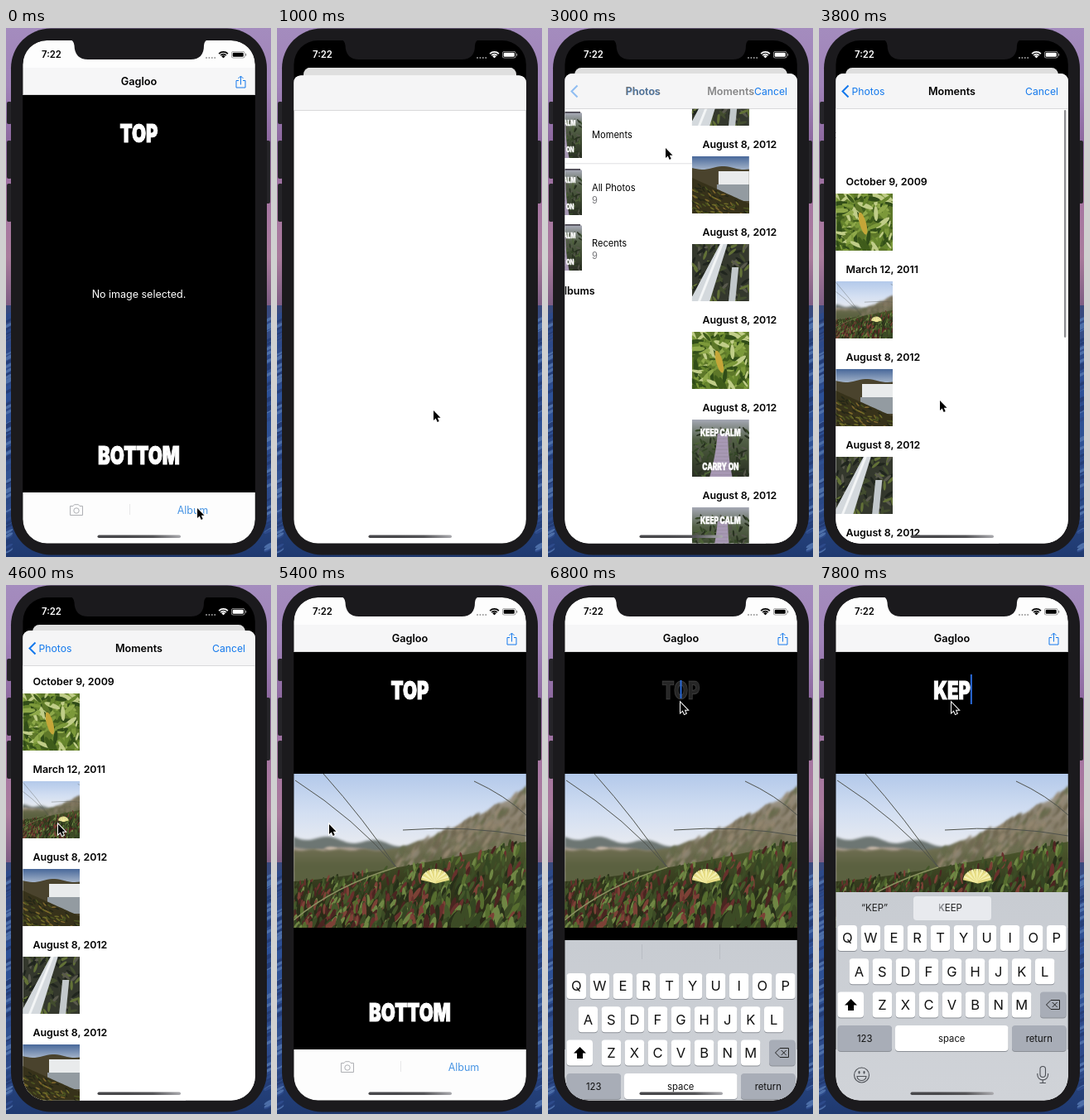
Write an HTML page with a canvas that moves like this. It is 320 px wide and 639 px high and loops after 8000 ms.

```html
<!DOCTYPE html>
<html lang="en">
<head>
<meta charset="utf-8">
<title>Caption app demo</title>
<style>
html, body { margin: 0; width: 100%; height: 100%; overflow: hidden; background: #1b1a1d; }
canvas { display: block; width: 320px; height: 639px; }
</style>
</head>
<body>
<canvas id="stage"></canvas>
<script>
const W = 320, H = 639, LOOP = 8000, STEP = 200;
const LEFT = 20, TOP = 15, WIDTH = 281, HEIGHT = 608, MID = 160.5;
const BLUE = '#1479ec', BEZEL = '#1b1a1d';
const canvas = document.getElementById('stage');
const ratio = window.devicePixelRatio || 1;
canvas.width = W * ratio;
canvas.height = H * ratio;
const c = canvas.getContext('2d');

// Helpers
const mix = (a, b, p) => a + (b - a) * p;
const progress = (t, from, to) => Math.max(0, Math.min(1, (t - from) / (to - from)));
const easeOut = (t, from, to, power = 3) => 1 - (1 - progress(t, from, to)) ** power;
function random(seed) {
  return () => (seed = (seed * 16807) % 2147483647) / 2147483647;
}
function scoped(draw) { c.save(); draw(); c.restore(); }
function shifted(x, y, draw) { scoped(() => { c.translate(x, y); draw(); }); }
function faded(alpha, draw) { scoped(() => { c.globalAlpha = alpha; draw(); }); }
function rect(x, y, w, h, fill) { c.fillStyle = fill; c.fillRect(x, y, w, h); }
function round(x, y, w, h, r, fill) {
  c.beginPath();
  c.roundRect(x, y, w, h, r);
  c.fillStyle = fill;
  c.fill();
}
function clip(x, y, w, h, r = 0) {
  c.beginPath();
  c.roundRect(x, y, w, h, r);
  c.clip();
}
function stroke(d, color, width = 1) {
  c.strokeStyle = color;
  c.lineWidth = width;
  c.stroke(new Path2D(d));
}
function fill(d, color) { c.fillStyle = color; c.fill(new Path2D(d)); }
function fade(vertical, from, to, ...colors) {
  const g = vertical ? c.createLinearGradient(0, from, 0, to) : c.createLinearGradient(from, 0, to, 0);
  colors.forEach((color, i) => g.addColorStop(i / (colors.length - 1), color));
  return g;
}
function text(s, x, y, { size = 12.5, weight = 400, color = '#000', align = 'left' } = {}) {
  c.font = `${weight} ${size}px Inter, Roboto, sans-serif`;
  c.textAlign = align;
  c.fillStyle = color;
  c.fillText(s, x, y);
}
// Condensed heavy caption face; returns the drawn width.
function caption(s, x, y, size = 30) {
  const narrow = 0.735;
  let width;
  shifted(x, y, () => {
    c.scale(narrow, 1);
    text(s, 0, 0, { size, weight: 900, color: '#fff', align: 'center' });
    c.strokeStyle = '#fff';
    c.lineWidth = size / 28;
    c.strokeText(s, 0, 0);
    width = c.measureText(s).width * narrow;
  });
  return width;
}

// Landscape pieces
function ridge(w, h, height, color) {
  c.beginPath();
  for (let x = 0; x <= w + 3; x += 3) c.lineTo(x, height(x));
  c.lineTo(w, h);
  c.lineTo(0, h);
  c.fillStyle = color;
  c.fill();
}
function fall(from, to, center, width, color) {
  for (let y = from; y < to; y++) rect(center(y) - width(y) / 2, y, width(y), 1.3, color);
}
function scatter(seed, count, colors, paint) {
  const rnd = random(seed);
  for (let i = 0; i < count; i++) paint(rnd, colors[Math.floor(rnd() * colors.length)], i / count);
}
function leaf(x, y, length, angle, color) {
  c.beginPath();
  c.ellipse(x, y, length, length * 0.28, angle, 0, 7);
  c.fillStyle = color;
  c.fill();
}

// Pictures
function beach() {
  const w = 281, h = 187;
  const dune = x => 92 - 76 * progress(x, 115, 285) ** 1.3 + Math.sin(x / 5);
  const bank = x => 130 - 48 * (x / w) ** 1.3;
  rect(0, 0, w, h, fade(true, 0, 95, '#b3c9ea', '#d3dff2', '#ecedf0'));
  scoped(() => {
    c.filter = `blur(${1.6 * ratio}px)`;
    ridge(w, h, x => 76 + Math.sin(x / 9) * 3 + x * 0.07, '#6d7673');
    ridge(w, h, x => 89 + Math.sin(x / 14) * 2 + x * 0.03, '#b0a295');
    scatter(5, 60, ['#80766e', '#c8b9aa', '#94897b'], (rnd, color) => leaf(rnd() * 125, 90 + rnd() * 38, 7, 0.1, color));
    ridge(w, h, dune, fade(true, 15, 110, '#a09c92', '#8b806b', '#5b6140'));
    scatter(77, 260, ['#968871', '#666b4b', '#8d8574', '#6f6751'], (rnd, color) => {
      const x = 125 + rnd() * 160;
      leaf(x, dune(x) + rnd() * 50, 6, -1, color);
    });
  });
  ridge(w, h, bank, fade(true, 90, h, '#4b562c', '#31371b', '#262313'));
  const greens = ['#44572a', '#566d2f', '#344522', '#6f8644', '#272f19', '#3c4b25'];
  const reds = ['#67302c', '#4b2521', '#7c4136'];
  scatter(41, 720, greens, (rnd, green, depth) => {
    const x = rnd() * w, y = mix(bank(x), 192, depth), size = mix(4, 11, depth) + x / 80;
    const red = rnd() < 0.45 - x / 900;
    leaf(x, y, size * (0.6 + rnd() * 0.5), rnd() * 0.9 - 1.75, red ? reds[Math.floor(rnd() * 3)] : green);
  });
  const tip = '124 113';
  stroke(`M2 8Q75 55 ${tip}M36 0Q85 55 ${tip}M132 68Q210 62 281 75M218 9Q255 26 281 50`, '#4f524c');
  stroke(`M0 177Q50 135 ${tip}`, '#8a9160', 1.4);
  for (let i = 0; i <= 14; i++) {
    const a = Math.PI * (1.05 + i / 15.5);
    stroke(`M172 131L${171 + Math.cos(a) * 17} ${129 + Math.sin(a) * 14}`, i % 2 ? '#f6f1b2' : '#e6dc83', 3);
  }
}
function leaves() {
  rect(0, 0, 69, 69, '#5d7729');
  scatter(31, 150, ['#3f5c1b', '#67862d', '#8fa94a', '#314d18', '#7c993a', '#c0cd88'],
    (rnd, color) => leaf(rnd() * 69, rnd() * 69, 4 + rnd() * 7, rnd() * 6, color));
  leaf(33, 36, 14, 1.3, '#c5a638');
}
function coast() {
  const shore = x => 26 + x * 0.45;
  rect(0, 0, 69, 69, fade(true, 0, 40, '#48689a', '#b9c5d4', '#8d9a9f'));
  ridge(69, 69, x => 14 + Math.sin(x / 8) * 2, '#4a432d');
  rect(32, 18, 37, 16, '#e9ebec');
  rect(30, 34, 39, 20, '#939ba1');
  ridge(69, 69, shore, '#37321a');
  scatter(9, 110, ['#6e6b27', '#242616', '#7f672c', '#4c5420'], (rnd, color) => {
    const x = rnd() * 69;
    leaf(x, shore(x) + 3 + rnd() * 40, 3, rnd(), color);
  });
}
function stream() {
  rect(0, 0, 69, 69, '#34382d');
  scatter(15, 90, ['#20251e', '#434d2f', '#59594d', '#627137'], (rnd, color) => leaf(rnd() * 69, rnd() * 69, 6, rnd() * 3, color));
  fall(0, 69, y => 38 - y * 0.42, y => 9 + y * 0.22, '#d4d9dd');
  fall(0, 69, y => 36 - y * 0.4, () => 3, '#f3f5f6');
  fall(28, 69, y => 55 - y * 0.1, () => 8, '#c2c8cb');
}
function poster() {
  rect(0, 0, 53, 55, fade(true, 0, 55, '#a5a8b4', '#536047', '#3b462f', '#292d24'));
  scatter(53, 130, ['#344627', '#4e6238', '#27301f', '#55564b'], (rnd, color) => leaf(rnd() * 53, 9 + rnd() * 46, 3, rnd() * 3, color));
  fall(13, 55, y => 29 - y / 25, y => 9 + (y / 17) ** 2.2, '#a798b4');
  caption('KEEP CALM', 26.5, 15, 8.7);
  caption('CARRY ON', 26.5, 47, 8.7);
}
function picture(draw, x, y, w, h, scale = 1, shift = 0) {
  scoped(() => {
    clip(x, y, w, h);
    c.translate(x - shift, y);
    c.scale(scale, scale);
    draw();
  });
}

// Phone
function wallpaper() {
  rect(0, 0, W, 346, fade(true, 0, 346, '#a48cbe', '#a083b8', '#8d689f', '#a676a2', '#a97b9c', '#76587f'));
  rect(0, 335, W, 304, fade(true, 335, H, '#39497c', '#2c5097', '#305292', '#1f3970'));
  scatter(21, 160, ['#243d77', '#4d6fa9', '#2d4a8a'], (rnd, color) => leaf(rnd() < 0.5 ? 3 : 317, 345 + rnd() * 290, 6, -0.5, color));
}
function phoneBody() {
  const button = (x, y, h) => round(x, y, 6, h, 2, '#252428');
  button(1, 89, 27);
  button(1, 136, 46);
  button(1, 188, 46);
  button(313, 136, 76);
  round(6, 0.5, 309, 636, 48, BEZEL);
}
function statusBar(color) {
  text('7:22', 55, 36, { size: 11.3, weight: 600, color, align: 'center' });
  for (let i = 0; i < 4; i++) round(241 + i * 3.4, 35, 2, 2, 1, '#999');
  for (let i = 0; i < 3; i++) {
    c.beginPath();
    c.arc(262.5, 36.4, 1.7 + i * 2.95, -Math.PI * 0.75, -Math.PI * 0.25);
    c.strokeStyle = color;
    c.lineWidth = i ? 1.8 : 3;
    c.stroke();
  }
  round(272, 28, 16.5, 8.5, 2.5, '#999');
  round(272.8, 28.8, 14.9, 6.9, 2, color === '#fff' ? '#000' : '#fff');
  round(273.7, 29.7, 13, 5.1, 1.2, color);
  round(289, 30.8, 1.2, 3, 0.6, '#888');
}
function notch() {
  fill('M76 13Q82 15 82.5 21Q83 38 99 38H223Q239 38 239 21Q239 15 246 13Z', BEZEL);
}

// Editor
function editor(t) {
  rect(LEFT, TOP, WIDTH, HEIGHT, '#000');
  rect(LEFT, TOP, WIDTH, 33, '#fdfdfd');
  rect(LEFT, 48, WIDTH, 33, '#f6f6f7');
  rect(LEFT, 80.5, WIDTH, 0.5, '#b8b8ba');
  text('Gagloo', MID, 69, { size: 12.7, weight: 600, align: 'center' });
  stroke('M281 63.5h-3v8.5h11v-8.5h-3M283.5 68.5v-10M280.5 61l3-3 3 3', BLUE);
  if (t >= 4600) picture(beach, LEFT, 228, WIDTH, 186);
  else text('No image selected.', MID, 326, { color: '#fff', align: 'center' });

  const focus = easeOut(t, 6600, 7100);
  const typed = 'KEP'.slice(0, Math.max(0, Math.floor((t - 7200) / STEP)));
  let width = 0;
  if (typed) width = caption(typed, MID, 138) + 2;
  else faded((1 - focus) ** 1.25, () => caption('TOP', MID, 138));
  if (focus > 0) {
    const h = 36 * focus ** 2;
    rect(MID + width / 2 - 1, 126 - h / 2, 2, h, '#2a6ad8');
  }
  caption('BOTTOM', MID, 527);

  rect(LEFT, 561, WIDTH, 62, '#fdfdfd');
  rect(149.3, 575, 0.7, 13, '#dedee0');
  stroke('M77.5 577.5h3.5l1.5-1.8h5l1.5 1.8h3.5v11h-15zM88.2 583a3.2 3.2 0 1 0-6.4 0a3.2 3.2 0 1 0 6.4 0', '#aeb0b4');
  text('Album', 225.5, 586.7, { color: '#4a96e4', align: 'center' });
  if (focus > 0) shifted(0, Math.round(268 * (1 - focus)), () => keyboard(typed));
}

// Keyboard
const SMALL = 11.3, DARK_KEY = '#a8adb7';
function key(x, y, w, label, size = 16.5, color = '#fff') {
  round(x, y + 1, w, 31, 4, '#8b8f96');
  round(x, y, w, 31, 4, color);
  text(label, x + w / 2, y + 15.5 + size * 0.36, { size, color: '#111', align: 'center' });
}
function suggestions(typed) {
  const style = { size: 11.5, color: '#222' };
  if (typed) text(`“${typed}”`, 67, 394, { ...style, align: 'center' });
  if (typed === 'KEP') {
    round(114, 376, 94, 29, 4, '#e8eaee');
    text('KEEP', 144, 394, style);
    text('K', 144, 394, { ...style, color: '#999ba0' });
  } else {
    rect(113, 376, 0.7, 18, '#b2b6bd');
    rect(207, 376, 0.7, 18, '#b2b6bd');
  }
}
function keyboard(typed) {
  const pitch = 28.05, ink = '#4d5056';
  rect(LEFT, 371, WIDTH, 268, fade(true, 371, 623, '#c8ccd2', '#d0d3d8'));
  suggestions(typed);
  ['QWERTYUIOP', 'ASDFGHJKL', 'ZXCVBNM'].forEach((letters, row) => {
    const x = MID + 2.3 - letters.length * pitch / 2;
    [...letters].forEach((letter, i) => key(x + i * pitch, 411 + row * 40.2, 23.5, letter));
  });
  key(22.5, 491.5, 31.5, '');
  fill('M38.5 500l7.5 7.5h-4v6.5h-7v-6.5h-4z', '#000');
  key(267, 491.5, 31.5, '', SMALL, DARK_KEY);
  stroke('M274.5 507l5.5-5.5h10.5v11h-10.5zM281.7 504l6 6m0-6l-6 6', '#222');
  key(22.5, 532, 65.5, '123', SMALL, DARK_KEY);
  key(92, 532, 136.5, 'space', SMALL);
  key(233, 532, 65.5, 'return', SMALL, DARK_KEY);

  stroke('M60.5 592a9 9 0 1 0-18 0a9 9 0 1 0 18 0M46 593.5h11a5.5 5 0 0 1-11 0z', ink, 1.1);
  round(47.5, 587, 2, 3.5, 1, ink);
  round(53.5, 587, 2, 3.5, 1, ink);
  c.beginPath();
  c.roundRect(267, 581.5, 6.5, 13, 3.2);
  c.stroke();
  stroke('M263.8 590v1.5a6.4 6.4 0 0 0 12.8 0v-1.5M270.2 598v3.5m-3.7 0h7.4', ink, 1.1);
}

// Photo picker
function albumList() {
  rect(LEFT, 97, WIDTH, 526, '#fff');
  ['Moments', 'All Photos', 'Recents'].forEach((name, i) => {
    const y = i ? 104 + i * 67 : 102;
    rect(29, y - 1, 48, 2, '#4c4953');
    rect(27.5, y + 0.5, 51, 2, '#777581');
    picture(poster, 26, y + 1, 53, 54);
    text(name, 91, y + (i ? 25.7 : 31), { size: 11.1 });
    if (i) text('9', 91, y + 41, { size: 11.1, color: '#77777b' });
    stroke(`M283 ${y + 24.5}l4 4-4 4`, '#b9b9bd', 1.4);
  });
  rect(LEFT, 163.5, WIDTH, 0.7, '#d2d2d5');
  text('My Albums', 26.5, 322, { weight: 600 });
}
function moments(scroll, showBar) {
  const photos = [leaves, beach, coast, stream, coast, stream, leaves, poster, poster];
  const dates = ['October 9, 2009', 'March 12, 2011'];
  rect(LEFT, 97, WIDTH, 526, '#fff');
  photos.forEach((photo, i) => {
    const y = 131 + i * 106 - scroll;
    if (y > H || y < 0) return;
    text(dates[i] || 'August 8, 2012', 32.5, y - 10.3, { weight: 600, size: 12.4 });
    if (photo === beach) picture(photo, LEFT, y, 69, 69, 0.37, 14);
    else picture(photo, LEFT, y, 69, 69, photo === poster ? 1.3 : 1);
  });
  if (showBar) round(296, 99 + Math.max(0, scroll) * 0.53, 2.3, 286 + Math.min(0, scroll) * 0.16, 1.1, '#8d8d91');
}
function picker(t) {
  const loaded = t >= 1400, push = easeOut(t, 2900, 3450);
  const scroll = t < 3800 ? mix(400, -69, easeOut(t, 3350, 3800, 1.6)) : mix(-69, 0, easeOut(t, 3800, 4300));
  rect(LEFT, 55, WIDTH, HEIGHT, '#fff');
  if (loaded) {
    shifted(-84 * push, 0, albumList);
    if (push) shifted(WIDTH * (1 - push), 0, () => moments(scroll, t >= 3400 && t < 4600));
  }
  rect(LEFT, 55, WIDTH, 42, '#f5f5f6');
  rect(LEFT, 97, WIDTH, 0.7, '#c9c9cc');
  if (!loaded) return;
  const title = { weight: 600, size: 12.6, align: 'center' }, link = { color: BLUE, size: 12.2 };
  const back = mix(MID, 59.5, push);
  faded(1 - push, () => text('Photos', back, 81, title));
  faded(push, () => {
    text('Photos', back, 81, { ...link, align: 'center' });
    text('Moments', MID + 110 * (1 - push), 81, title);
    stroke('M35.5 69.5l-7 7 7 7', BLUE, 2);
  });
  text('Cancel', 289, 81, { ...link, align: 'right' });
}

// Pointer moves: departure and arrival times, then the place reached
const MOVES = [[600, 1000, 189, 462], [1000, 1800, 142, 145], [3300, 3700, 146, 450], [4000, 4400, 63, 289], [5500, 6200, 160, 142]];
function pointer(t) {
  let x = 231, y = 580;
  for (const [from, to, toX, toY] of MOVES) {
    const p = progress(t, from, to);
    x = mix(x, toX, p);
    y = mix(y, toY, p);
  }
  shifted(x, y, () => {
    const arrow = 'M0 0v12l2.7-2.4 2 4.3 2-.9-1.9-4.2h3.7z';
    stroke(arrow, '#fff', 2);
    fill(arrow, '#000');
  });
}

function draw(t) {
  const open = easeOut(t, 400, 1200, 4) * (1 - easeOut(t, 4600, 5300));
  c.setTransform(ratio, 0, 0, ratio, 0, 0);
  wallpaper();
  phoneBody();
  scoped(() => {
    clip(LEFT + 0.4, TOP, WIDTH - 0.6, HEIGHT - 0.5, 29);
    rect(0, 0, W, H, '#000');
    shifted(MID, mix(TOP, 48, open), () => {
      const scale = mix(1, 257 / WIDTH, open);
      c.scale(scale, scale);
      c.translate(-MID, -TOP);
      clip(LEFT, TOP, WIDTH, HEIGHT, mix(29, 9, open));
      editor(t);
      rect(LEFT, TOP, WIDTH, HEIGHT, `rgba(0,0,0,${0.12 * open})`);
    });
    if (open > 0) shifted(0, 568 * (1 - open), () => {
      clip(LEFT, 55, WIDTH, HEIGHT, 9);
      picker(t);
    });
    statusBar(open > 0.5 ? '#fff' : '#000');
    round(110.5, 612.5, 100.5, 3.4, 1.7, fade(false, 110, 211, '#48484b', '#48484b', '#555558', '#aaaaae'));
  });
  notch();
  pointer(t);
}

const start = performance.now();
let shown = -1;
function tick() {
  const t = Math.floor(((performance.now() - start) % LOOP) / STEP) * STEP;
  if (t !== shown) draw(shown = t);
  requestAnimationFrame(tick);
}
tick();
</script>
</body>
</html>
```
